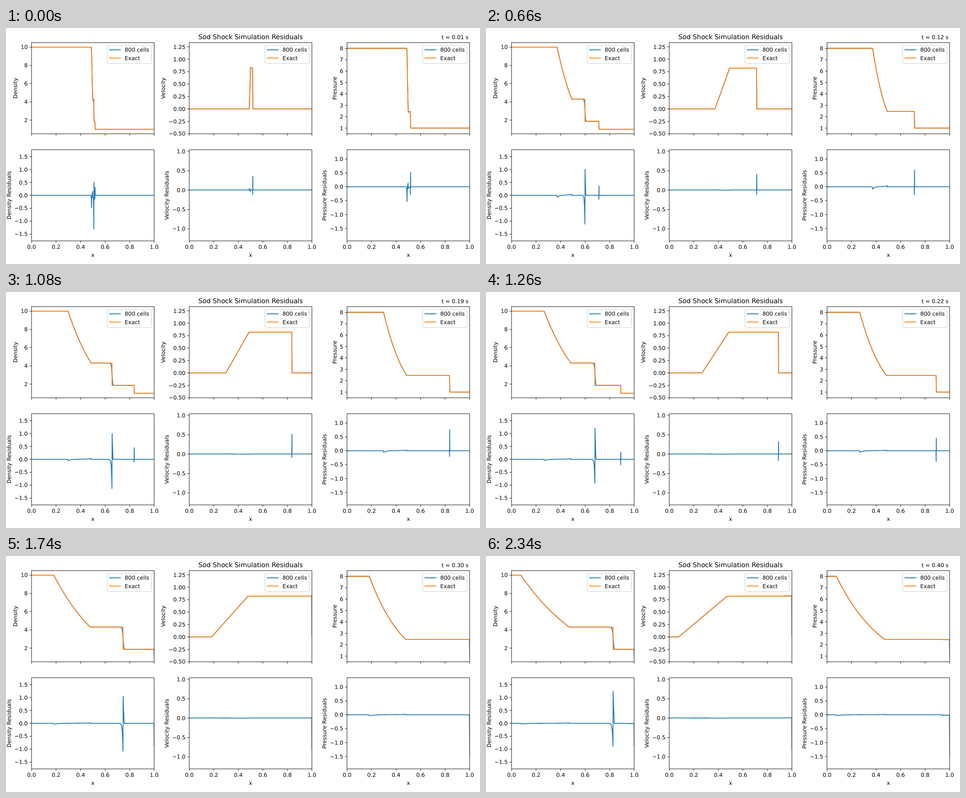
An HTML page for the animation above (2400 ms loop, 1058 by 529 pixels).

```html
<!DOCTYPE html>
<html lang="en">
<head>
<meta charset="utf-8">
<title>Shock tube residuals</title>
<style>
  html, body { margin: 0; width: 100%; height: 100%; overflow: hidden; background: #fff; }
  svg { display: block; width: 1058px; height: 529px; }
  text { font: 12.22px "DejaVu Sans", sans-serif; text-rendering: geometricPrecision; }
  .title { font-size: 14.66px; }
  .curve { fill: none; stroke-width: 1.83; stroke-linejoin: round; stroke-linecap: square; }
  .axis { fill: none; stroke: #000; stroke-width: 0.98; }
</style>
</head>
<body>
<svg id="stage" viewBox="0 0 1058 529"></svg>
<script>
const BLUE = '#1f77b4', ORANGE = '#ff7f0e';
const LEFT = 57, PITCH = 352.1, WIDTH = 273.7, HEIGHT = 204.3;
const FONT = 12.22, TICK = 4.27, CELLS = 800;
const TOPS = [32.8, 272.9];
const stage = document.getElementById('stage');

function add(parent, tag, attrs, content) {
  const node = document.createElementNS('http://www.w3.org/2000/svg', tag);
  for (const key in attrs) node.setAttribute(key, attrs[key]);
  if (content !== undefined) node.textContent = content;
  parent.appendChild(node);
  return node;
}
const label = (x, y, content, anchor = 'middle', extra = {}) =>
  add(stage, 'text', { x, y, 'text-anchor': anchor, ...extra }, content);

// zero: pixel row of value 0, unit: pixels per 1, ticks: first, step, count, decimals
const panels = [
  { col: 0, row: 0, name: 'Density', zero: 247.3, unit: 20.43, ticks: [2, 2, 5, 0], labelX: 25.3 },
  { col: 1, row: 0, name: 'Velocity', zero: 181.4, unit: 111.3, ticks: [-0.5, 0.25, 8, 2], labelX: 355.4 },
  { col: 2, row: 0, name: 'Pressure', zero: 249.85, unit: 25.54, ticks: [1, 1, 8, 0], labelX: 737.7 },
  { col: 0, row: 1, name: 'Density Residuals', zero: 375.1, unit: 57.9, ticks: [-1.5, 0.5, 7, 1], labelX: 10.8 },
  { col: 1, row: 1, name: 'Velocity Residuals', zero: 363.2, unit: 86.7, ticks: [-1, 0.5, 5, 1], labelX: 362.9 },
  { col: 2, row: 1, name: 'Pressure Residuals', zero: 355.9, unit: 62.3, ticks: [-1.5, 0.5, 6, 1], labelX: 715.2 }
];

function drawLegend(right, top) {
  const width = 8.07 * FONT, x = right - 6.1 - width, y = top + 6.1;
  add(stage, 'rect', { x, y, width, height: 40.7, rx: 2.44, fill: '#fff', 'fill-opacity': 0.8,
    stroke: '#ccc', 'stroke-opacity': 0.8, 'stroke-width': 1.22 });
  [['800 cells', BLUE], ['Exact', ORANGE]].forEach(([name, stroke], i) => {
    const row = y + 10.1 + i * 18.4;
    add(stage, 'path', { class: 'curve', stroke, d: `M${x + 4.9} ${row}h${2 * FONT}` });
    label(x + 3.2 * FONT, row + 4.3, name, 'start');
  });
}

function drawPanel(panel) {
  const x = LEFT + panel.col * PITCH, y = TOPS[panel.row], bottom = y + HEIGHT;
  const clip = add(stage, 'clipPath', { id: `clip${panel.col}${panel.row}` });
  add(clip, 'rect', { x, y, width: WIDTH, height: HEIGHT });
  const group = add(stage, 'g', { 'clip-path': `url(#${clip.id})` });
  panel.numeric = add(group, 'path', { class: 'curve', stroke: BLUE });
  if (!panel.row) panel.exact = add(group, 'path', { class: 'curve', stroke: ORANGE });

  let marks = `M${x} ${y}h${WIDTH}v${HEIGHT}h${-WIDTH}z`;
  for (let i = 0; i <= 5; i++) {
    const tx = x + i * WIDTH / 5;
    marks += `M${tx} ${bottom}v${TICK}`;
    if (panel.row) label(tx, 495.4, (i / 5).toFixed(1));
  }
  const [first, step, count, digits] = panel.ticks;
  for (let i = 0; i < count; i++) {
    const value = first + i * step, ty = panel.zero - value * panel.unit;
    marks += `M${x} ${ty}h${-TICK}`;
    label(x - 2 * TICK, ty + 4.4, value.toFixed(digits).replace('-', '−'), 'end');
  }
  add(stage, 'path', { class: 'axis', d: marks });
  const middle = y + HEIGHT / 2;
  label(panel.labelX, middle, panel.name, 'middle', { transform: `rotate(-90 ${panel.labelX} ${middle})` });
  if (panel.row) label(x + WIDTH / 2, 513.2, 'x');
  else drawLegend(x + WIDTH, y);
}

panels.forEach(drawPanel);
label(LEFT + PITCH + WIDTH / 2, 25.3, 'Sod Shock Simulation Residuals', 'middle', { class: 'title' });
const clock = label(972.2, 24.6, '', 'start');

// Riemann solution for (rho, u, p): left (10, 0, 8), right (1, 0, 1), gamma 1.4
const SOUND = Math.sqrt(1.4 * 8 / 10);
const P_STAR = 2.4571, U_STAR = 0.8212, SHOCK = 1.7744;
const RHO_LEFT = 10 * (P_STAR / 8) ** (1 / 1.4);
const RHO_RIGHT = (P_STAR + 1 / 6) / (P_STAR / 6 + 1);
const TAIL = 1.2 * U_STAR - SOUND;
const EXIT_TIME = 0.5 / SHOCK;

function exactState(x, t) {
  const xi = (x - 0.5) / t;
  if (xi < -SOUND) return [10, 0, 8];
  if (xi < TAIL) {
    const u = (SOUND + xi) / 1.2, ratio = 1 - 0.2 * u / SOUND;
    return [10 * ratio ** 5, u, 8 * ratio ** 7];
  }
  if (xi < U_STAR) return [RHO_LEFT, U_STAR, P_STAR];
  if (xi < SHOCK) return [RHO_RIGHT, U_STAR, P_STAR];
  return [1, 0, 1];
}

function fanError(x, t) {
  const head = 0.5 - SOUND * t, tail = 0.5 + TAIL * t, width = tail - head;
  const dip = 0.0105 / (t + 0.011), peak = 0.0065 / (t + 0.01);
  let low = 0, high = 0;
  if (x < head) low = Math.exp((x - head) / 0.0015);
  else if (x < tail) {
    low = Math.exp((head - x) / (0.12 * width));
    high = 0.45 * (x - head) / width + 0.55 * Math.exp((x - tail) / (0.06 * width));
  } else high = -0.25 * Math.exp((tail - x) / 0.006);
  low *= dip;
  high *= peak;
  return [high - low, 0.095 * low - 0.215 * high, 0.88 * high - 1.1 * low];
}

// Smeared contact: amplitudes depend on where the jump falls between two nodes
function contactError(i, t) {
  const place = (0.5 + U_STAR * t) * (CELLS - 1), cell = Math.floor(place), f = place - cell;
  const start = Math.exp((0.01 - t) * 40);
  if (i <= cell) return (-1.18 + 0.3 * f) * (1 + 0.1 * start) * Math.exp((i - cell) / (6 * Math.cbrt(t)));
  const reach = 8 * Math.cbrt(t / 0.4);
  return (0.94 + 0.31 * f) * (1 - 0.45 * start) * Math.max(0, 1 - (i - cell - 1) / reach) ** 1.3;
}

function shockError(i, t) {
  const place = (0.5 + SHOCK * t) * (CELLS - 1), cell = Math.floor(place), f = place - cell;
  if (i === cell) {
    return [-0.335 + 0.35 * f - 0.1 * f * f, -0.27 + 0.3 * f - 0.1 * f * f, -0.59 + 0.58 * f - 0.16 * f * f];
  }
  if (i === cell + 1) {
    const start = 1 - 0.18 * Math.exp((0.01 - t) * 40);
    return [0.13 + 0.37 * f, 0.16 + 0.4 * f, 0.2 + 0.64 * f].map(v => v * start);
  }
  return [0, 0, 0];
}

// After the shock leaves, the fixed right edge sends a weak wave back
function edgeError(i, x, t) {
  if (t < EXIT_TIME) return [0, 0, 0];
  if (i === CELLS - 1) return [1 - RHO_RIGHT, -U_STAR, 1 - P_STAR];
  return x > 1 - 0.54 * (t - EXIT_TIME) ? [-0.007, 0.006, -0.014] : [0, 0, 0];
}

function render(t) {
  const exact = [[], [], []], numeric = [[], [], []], residual = [[], [], []];
  const plot = (list, panel, x, value) =>
    list.push((LEFT + panel.col * PITCH + x * WIDTH).toFixed(2) + ' ' + (panel.zero - value * panel.unit).toFixed(2));
  for (let i = 0; i < CELLS; i++) {
    const x = i / (CELLS - 1);
    const state = exactState(x, t), fan = fanError(x, t), shock = shockError(i, t), edge = edgeError(i, x, t);
    const contact = [contactError(i, t), 0, 0];
    for (let q = 0; q < 3; q++) {
      const error = fan[q] + contact[q] + shock[q] + edge[q];
      plot(exact[q], panels[q], x, state[q]);
      plot(numeric[q], panels[q], x, state[q] + error);
      plot(residual[q], panels[q + 3], x, error);
    }
  }
  for (let q = 0; q < 3; q++) {
    panels[q].exact.setAttribute('d', 'M' + exact[q].join('L'));
    panels[q].numeric.setAttribute('d', 'M' + numeric[q].join('L'));
    panels[q + 3].numeric.setAttribute('d', 'M' + residual[q].join('L'));
  }
  clock.textContent = `t = ${t.toFixed(2)} s`;
}

let shown = -1, origin;
function tick(now) {
  origin ??= now;
  const step = Math.floor((now - origin) % 2400 / 60);
  if (step !== shown) render((step + 1) / 100);
  shown = step;
  requestAnimationFrame(tick);
}
render(0.01);
requestAnimationFrame(tick);
</script>
</body>
</html>
```
